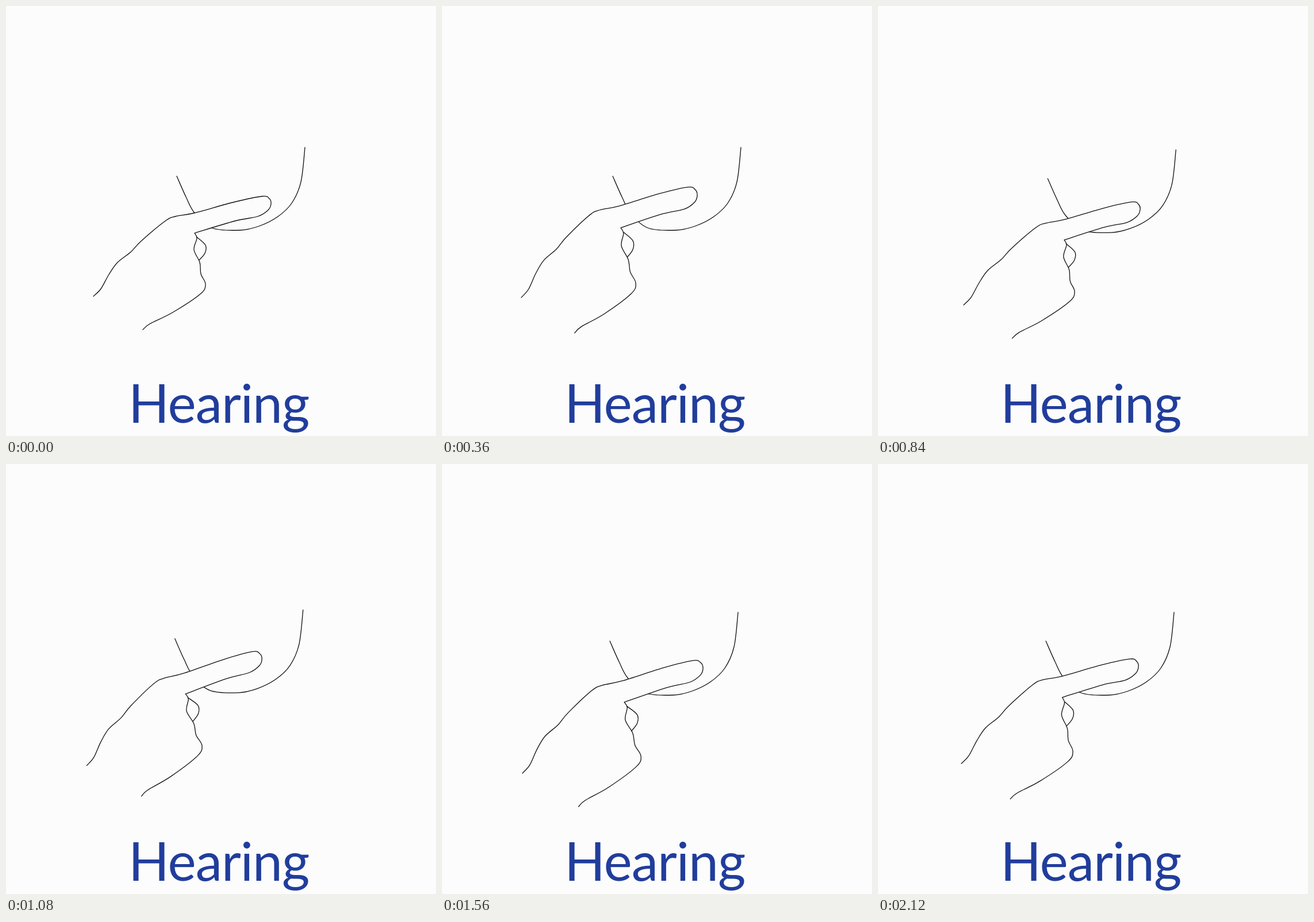
An HTML page that plays this animation: 748x748 px, repeating every 2160 ms.

```html
<!DOCTYPE html>
<html lang="en">
<head>
<meta charset="utf-8">
<title>Hearing</title>
<style>
html, body { margin: 0; width: 100%; height: 100%; overflow: hidden; background: #fcfcfc; }
svg { display: block; width: 100vw; height: 100vh; }
path { fill: none; stroke: #111; stroke-width: 1.3; stroke-linecap: round; stroke-linejoin: round; }
#hand { fill: #fcfcfc; }
text { font: 400 93px Lato, sans-serif; letter-spacing: -1px; fill: #213d9c; }
</style>
</head>
<body>
<svg viewBox="0 0 748 748">
  <path id="jaw"/>
  <path id="thumb"/>
  <path id="hand"/>
  <text x="213" y="725">Hearing</text>
</svg>
<script>
const LOOP = 2160;
const points = s => s.split(' ').map(p => p.split(',').map(Number));

// The resting drawing, as key points of smooth curves
const finger = points('152,505 165,492 179,467 194,446 217,428 235,409 277,374 295,366 328,360 397,341 446,331 458,335 461,344 456,355 438,366 398,374 328,395');
const fist = points('328,395 332,404 327,424 337,446 339,466 347,484 338,501 290,533 250,553 238,563');
const thumb = points('332,402 347,416 346,430 335,443');
const jaw = points('297,296 313,332 328,360 358,386 407,390 440,383 472,367 497,343 513,306 520,246');

// Tapping motion: where fingertip, wrist and knuckle are; the hand follows them
const taps = [
  { at: 0, pins: points('461,344 152,505 347,484') },
  { at: 360, pins: points('444,329 138,507 337,482') },
  { at: 840, pins: points('456,354 149,520 342,497') },
  { at: 1280, pins: points('437,327 134,528 340,484') },
  { at: 1560, pins: points('454,355 140,538 346,508') },
  { at: 1840, pins: points('451,354 129,546 345,507') },
  { at: 1960, pins: points('436,332 112,540 338,490') },
  { at: 2120, pins: points('453,353 145,521 339,500') }
];
const rest = taps[0].pins;

const smooth = u => u * u * (3 - 2 * u);
const clamp = u => Math.min(1, Math.max(0, u));
const mix = (a, b, u) => a.map((v, k) => v + (b[k] - v) * u);
const sub = (a, b) => [a[0] - b[0], a[1] - b[1]];
const cross = (a, b) => a[0] * b[1] - a[1] * b[0];
const draw = (id, d) => document.getElementById(id).setAttribute('d', d);

// Affine map that carries the resting pins to the given ones
function follow([tip, wrist, knuckle]) {
  const a = sub(rest[0], rest[2]), b = sub(rest[1], rest[2]);
  return p => {
    const d = sub(p, rest[2]);
    const u = cross(d, b) / cross(a, b), v = cross(a, d) / cross(a, b);
    return [0, 1].map(k => u * tip[k] + v * wrist[k] + (1 - u - v) * knuckle[k]);
  };
}

// Smooth curve through all points
function curve(pts) {
  let d = '';
  for (let i = 0; i < pts.length - 1; i++) {
    const b = pts[i], c = pts[i + 1], a = pts[i - 1] || b, e = pts[i + 2] || c;
    const p = [0, 1].map(k => b[k] + (c[k] - a[k]) / 6);
    const q = [0, 1].map(k => c[k] - (e[k] - b[k]) / 6);
    d += `C${p} ${q} ${c}`;
  }
  return d;
}
const line = pts => `M${pts[0]}` + curve(pts);

// Drawings are held for 80, 80, 80 and 40 ms in turn
function heldTime(t) {
  const r = t % 280;
  return t - r + Math.floor(r / 80) * 80;
}

function render(t) {
  const next = Math.max(1, taps.findIndex(tap => tap.at >= t));
  const from = taps[next - 1], to = taps[next];
  const u = smooth((t - from.at) / (to.at - from.at));
  const place = follow(from.pins.map((p, n) => mix(p, to.pins[n], u)));

  const sink = smooth(clamp((t - 360) / 1200));
  draw('jaw', line(jaw.map(([x, y]) => [x - 5 * sink, y + 12 * sink])));
  draw('thumb', line(thumb.map(place)));
  draw('hand', line(finger.map(place)) + curve(fist.map(place)));
}

const start = performance.now();
function tick() {
  render(heldTime((performance.now() - start) % LOOP));
  requestAnimationFrame(tick);
}
tick();
</script>
</body>
</html>
```
